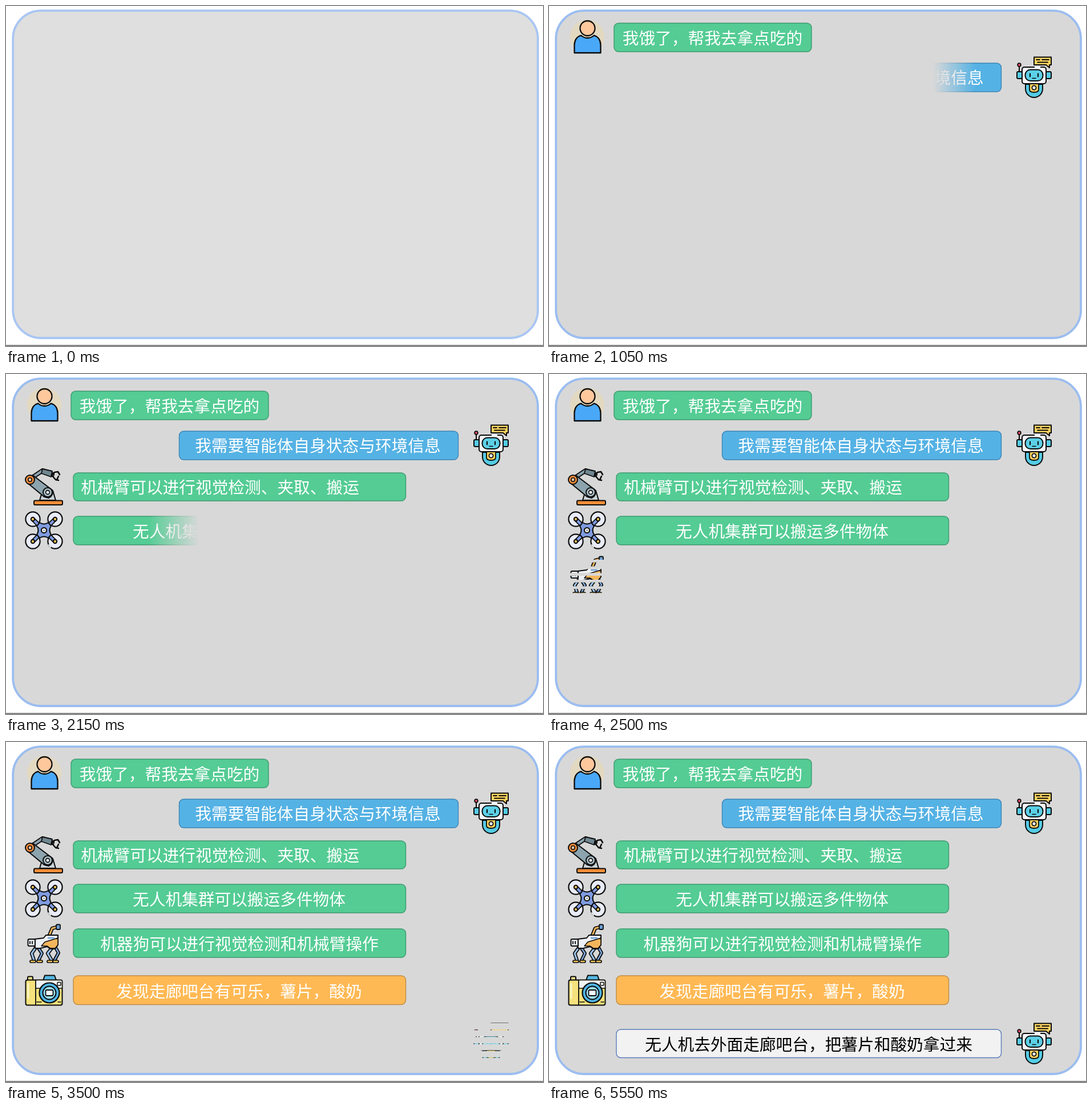
These frames come from a looping animation (941x595 px, 6.75 s). An HTML page with a canvas:

```html
<!DOCTYPE html>
<html lang="zh-CN">
<head>
<meta charset="utf-8">
<title>智能体对话</title>
<style>
html, body { margin: 0; width: 100%; height: 100%; overflow: hidden; background: #fff; }
canvas { display: block; width: 100vw; height: 100vh; }
</style>
</head>
<body>
<canvas id="stage" width="941" height="595"></canvas>
<script>
const W = 941, H = 595, LOOP = 6750, STEP = 50, SOFT = 0.15;
const INK = '#0b0b0b';
const main = document.getElementById('stage').getContext('2d');
const layer = document.createElement('canvas');
layer.width = W;
layer.height = H;
const off = layer.getContext('2d');
let g = main;

const clamp = v => Math.max(0, Math.min(1, v));

function paint(fill, stroke = INK, width = 2) {
  if (fill) { g.fillStyle = fill; g.fill(); }
  if (stroke) { g.strokeStyle = stroke; g.lineWidth = width; g.stroke(); }
}
function box(x0, y0, x1, y1, r, fill, stroke, width) {
  g.beginPath();
  g.roundRect(x0, y0, x1 - x0, y1 - y0, r);
  paint(fill, stroke, width);
}
function disc(x, y, r, fill, stroke, width) {
  g.beginPath();
  g.arc(x, y, r, 0, Math.PI * 2);
  paint(fill, stroke, width);
}
function shape(d, fill, stroke, width) {
  const p = new Path2D(d);
  if (fill) { g.fillStyle = fill; g.fill(p); }
  if (stroke !== null) {
    g.strokeStyle = stroke || INK;
    g.lineWidth = width || 2;
    g.stroke(p);
  }
}
// outlined limb
function limb(d, width, color) {
  shape(d, null, INK, width + 3.4);
  shape(d, null, color, width);
}

function person() {
  disc(67, 54, 30, '#e3d9c0', null);
  shape('M44.5 82V68Q45 55 56 51.5Q61 56 67.5 56Q74 56 79 51.5Q90 55 90.5 68V82Z', '#4aa8f8', INK, 2.3);
  disc(67.5, 39, 13, '#ffc79c', INK, 2.3);
}

function robot() {
  shape('M850 89.5H880V103H877V108L871 103H850Z', '#ffd45f');
  shape('M854 94H860M864 94H876M856 98.5H874', null, INK, 1.8);
  shape('M824 105V114', null);
  disc(824, 103, 2.8, '#e8506a', INK, 1.8);
  box(820, 115, 829, 127, 2, '#55cbe4');
  box(871, 115, 880, 127, 2, '#55cbe4');
  shape('M835 137H865V145A15 15 0 0 1 835 145Z', '#55cbe4');
  shape('M842 136H858V146Q858 151 850 151Q842 151 842 146Z', '#ffd45f', INK, 1.8);
  disc(850, 143, 3.6, '#e9eef3', INK, 1.8);
  box(829, 107, 871, 136, 4, '#f4f7fb');
  shape('M852 107H860', null, '#f4f7fb', 2.4);
  box(834.5, 111.5, 865.5, 131, 9, '#5cd0e6');
  shape('M843 118.5V123.5M857 118.5V123.5', null, INK, 2.2);
  shape('M847 126.5H853', null, INK, 1.5);
}

function arm() {
  limb('M43 183L64 169L81 176', 4.5, '#8aa0aa');
  shape('M64 166L81 170L79 180L62 174Z', '#6f8791', INK, 1.8);
  shape('M80 177L85 172L91 171M81 178L87 185L92 186M91 171L94 176M89 185L92 179', null, INK, 2.6);
  shape('M59 221L64 204H82L87 221Z', '#c9d3d6');
  shape('M38 191L48 178L81 203Q84 212 75 217L67 215Z', '#8ca4ae');
  disc(73, 207, 8, '#a9bdc5');
  disc(73, 207, 3.4, '#eef2f3', INK, 1.6);
  disc(42, 185, 8, '#f08a3c');
  disc(42, 185, 3.2, '#f3c9a6', INK, 1.6);
  box(49, 221.5, 99, 229, 2, '#f58d38');
}

function drone() {
  const hubs = [[47, 254], [86, 254], [47, 293], [86, 293]];
  for (const [x, y] of hubs) disc(x, y, 12.6, '#e9ecf8', INK, 2.2);
  limb('M48 255L85 292M85 255L48 292', 4.5, '#7f9be0');
  shape('M59 260Q66.5 265 74 260L79 266Q74 273.5 79 281L74 287Q66.5 282 59 287L54 281Q59 273.5 54 266Z', '#7f9be0');
  disc(66.5, 273.5, 4.6, '#f4f1dd', INK, 2);
  disc(66.5, 273.5, 1.6, '#7f9be0', null);
  for (const [x, y] of hubs) disc(x, y, 3.2, '#e3bd55', INK, 2);
  shape('M75 299L78 303', null, '#fff', 2);
}

function dog() {
  limb('M57 361L63 370L57 382', 2.6, '#7fa6d8');
  limb('M87 360L92 369L85 382', 2.6, '#7fa6d8');
  limb('M52 360L45 370L49 382', 3, '#9cc3ee');
  limb('M80 361L73 370L80 382', 3, '#9cc3ee');
  for (const x of [42, 54, 72, 82]) box(x, 382, x + 10, 386, 2, '#f2c65a', INK, 1.7);
  limb('M76 338L81 326L89 324', 3, '#f2b35a');
  box(88, 319.5, 95, 328, 1.5, '#6b9fd6', INK, 1.8);
  shape('M50 345L66 343L70 338H91V355L86 362H78L72 358L60 361H51Z', '#eef2f8');
  shape('M68 350L91 343V355L86 361H78L72 357H62Z', '#f4b65c', INK, 1.5);
  box(38.5, 345, 51, 357, 2, '#eef2f8');
  shape('M42 349V353M46 349V353', null, INK, 1.8);
  shape('M74 343H84', null, '#6b9fd6', 2.5);
}

function camera() {
  box(38, 410.5, 47, 418, 1.5, '#f6e78e');
  shape('M65 417L68 408.5H85L88 417Z', '#55b7e0');
  box(34.5, 416.5, 98.5, 460.5, 3, '#f5e27c');
  box(52, 417.5, 97.5, 431, 1, '#f0f4f6', null);
  shape('M52 417V460', null, INK, 1.8);
  shape('M52 431H98', null, INK, 1.5);
  shape('M39 423V448', null, '#fdf6c4', 3);
  box(90, 420.5, 96, 426, 1, '#fff', INK, 1.5);
  disc(76, 439, 17.5, '#4fb4e4', INK, 2.2);
  disc(76, 439, 11.5, '#9bdcf2', INK, 2);
  box(69.5, 434, 82.5, 444, 2, '#f3fafd', INK, 1.8);
  shape('M54 455H62M91 455H96', null, INK, 1.6);
}

const GREEN = ['#54cc94', '#3f9b70', '#fff'];
const BLUE = ['#55b2e4', '#3d86b8', '#fff'];
const ORANGE = ['#ffb954', '#c18c45', '#fff'];
const PALE = ['#f2f2f2', '#5a7dbb', '#000'];

// icon: drawing, top, height, shift; bubble: x0, y0, x1, y1, text centre x, y
const rows = [
  { icon: person, top: 24, h: 60, at: 160, box: [114, 30, 460, 80], mid: [286.5, 56], skin: GREEN, say: '我饿了，帮我去拿点吃的' },
  { icon: robot, top: 88, h: 73, at: 714, box: [303.5, 100, 792.5, 150], mid: [546.5, 125.5], skin: BLUE, back: true, say: '我需要智能体自身状态与环境信息' },
  { icon: arm, top: 165, h: 66, at: 1268, box: [118, 173, 700.5, 222], mid: [375, 198], skin: GREEN, say: '机械臂可以进行视觉检测、夹取、搬运' },
  { icon: drone, top: 239, h: 69, at: 1782, box: [118, 249, 700.5, 299], mid: [408.5, 275], skin: GREEN, say: '无人机集群可以搬运多件物体' },
  { icon: dog, top: 318, h: 70, at: 2336, box: [118, 327, 700.5, 377], mid: [409, 353], skin: GREEN, say: '机器狗可以进行视觉检测和机械臂操作' },
  { icon: camera, top: 407, h: 55, at: 2895, box: [118, 409, 700.5, 459.5], mid: [408.5, 436], skin: ORANGE, say: '发现走廊吧台有可乐，薯片，酸奶' },
  { icon: robot, top: 88, h: 73, dy: 403, at: 3465, iconMs: 440, gap: 30, textMs: 510, box: [118, 503, 792.5, 552.5], mid: [455, 529], skin: PALE, back: true, say: '无人机去外面走廊吧台，把薯片和酸奶拿过来' }
];

function blinds(row, p) {
  const slat = row.h / 6;
  g.save();
  g.translate(0, row.dy || 0);
  if (p < 1) {
    g.beginPath();
    for (let i = 0; i < 6; i++) g.rect(0, row.top + i * slat, W, slat * p);
    g.clip();
  }
  row.icon();
  g.restore();
}

function bubble(row) {
  const [fill, line, ink] = row.skin;
  box(...row.box, 8, fill, line, 1.4);
  g.fillStyle = ink;
  g.font = '28.7px "Noto Sans CJK SC", "Noto Sans CJK", sans-serif';
  g.textAlign = 'center';
  g.fillText(row.say, row.mid[0], row.mid[1] + 10.8);
}

function wipe(row, p) {
  if (p >= 1) return bubble(row);
  const x0 = row.box[0] - 1, x1 = row.box[2] + 1, w = x1 - x0;
  const dir = row.back ? -1 : 1, from = row.back ? x1 : x0;
  const lead = p * w * (1 + SOFT);
  off.clearRect(0, 0, W, H);
  g = off;
  bubble(row);
  const fade = off.createLinearGradient(from + dir * (lead - SOFT * w), 0, from + dir * lead, 0);
  fade.addColorStop(0, 'rgba(0,0,0,1)');
  fade.addColorStop(1, 'rgba(0,0,0,0)');
  off.globalCompositeOperation = 'destination-in';
  off.fillStyle = fade;
  off.fillRect(0, 0, W, H);
  off.globalCompositeOperation = 'source-over';
  g = main;
  g.drawImage(layer, 0, 0);
}

function draw(t) {
  g = main;
  g.lineJoin = g.lineCap = 'round';
  g.fillStyle = '#fff';
  g.fillRect(0, 0, W, H);
  g.fillStyle = '#858585';
  g.fillRect(0, 593, W, 2);
  const early = t < 150;
  box(12.2, 8.2, 932, 581, 49, early ? '#dfdfdf' : '#d8d8d8', early ? '#a9c6f3' : '#9bbdf0', 3.8);
  for (const row of rows) {
    const { at, iconMs = 277, gap = 0, textMs = 277 } = row;
    const p = clamp((t - at) / iconMs);
    const q = clamp((t - at - iconMs - gap) / textMs);
    if (p > 0) blinds(row, p);
    if (q > 0) wipe(row, q);
  }
}

const start = performance.now();
function tick() {
  const t = (performance.now() - start) % LOOP;
  draw(Math.floor(t / STEP) * STEP);
  requestAnimationFrame(tick);
}
tick();
</script>
</body>
</html>
```
